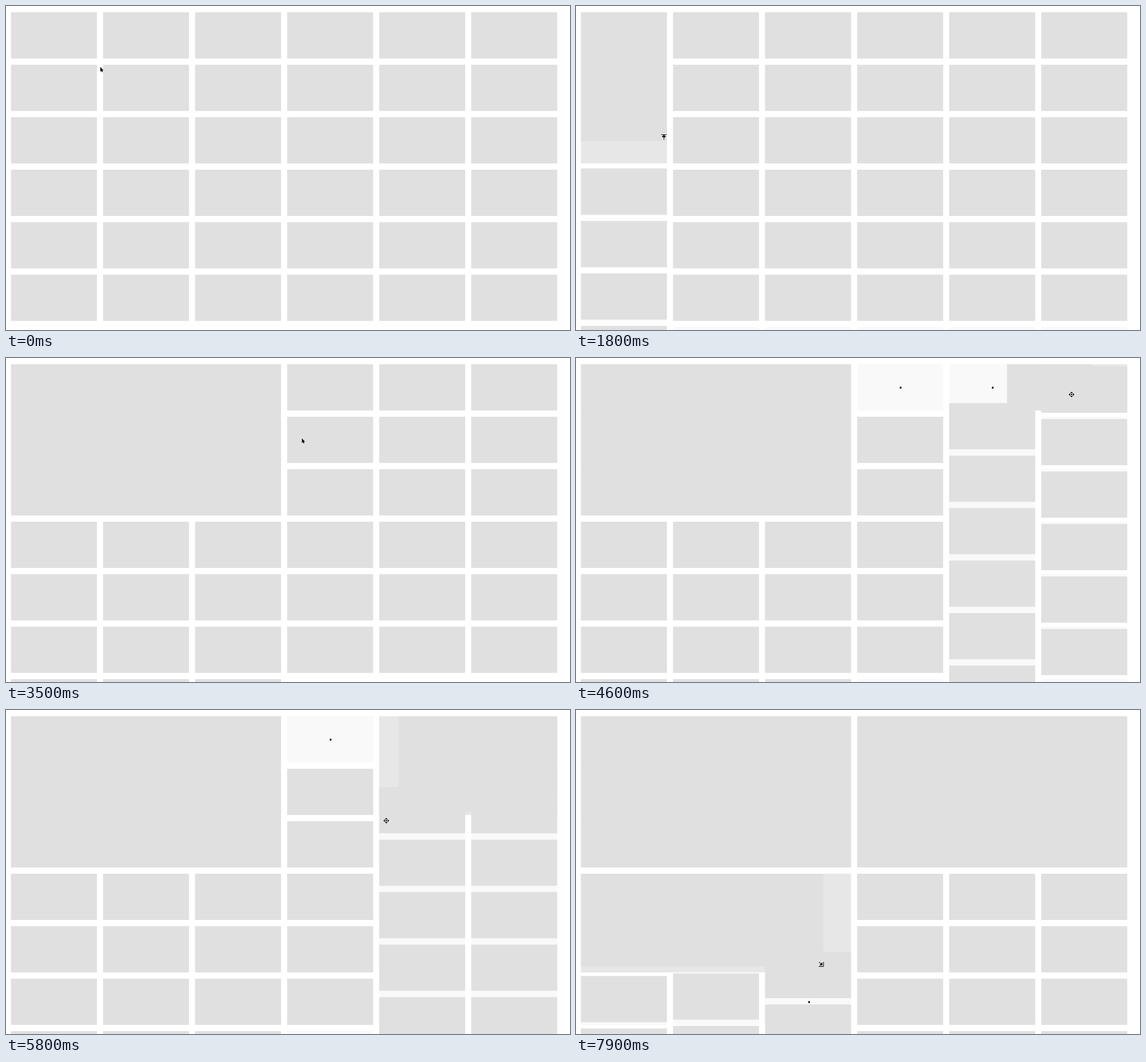
An HTML page with a canvas that plays this animation: 986x568 px, repeating every 8000 ms.

```html
<!DOCTYPE html>
<html lang="en">
<head>
<meta charset="utf-8">
<title>Resizable tile grid</title>
<style>
html, body { margin: 0; width: 100%; height: 100%; overflow: hidden; background: #fff; }
canvas { display: block; width: 986px; height: 568px; }
</style>
</head>
<body>
<canvas id="stage" width="986" height="568"></canvas>
<script>
const ctx = document.getElementById('stage').getContext('2d');
const LOOP = 8000, STEP = 100, SETTLE = 250, LAG = 22;
const COLS = 6, ROWS = 6;
const X0 = 8.7, PITCH_X = 160.93, TILE_W = 150.3;
const Y0 = 11, PITCH_Y = 92, TILE_H = 81;
const TILE = '#e0e0e0', SLOT = '#e7e7e7', CELL = '#f9f9f9';

const lerp = (a, b, p) => a + (b - a) * p;
const clamp01 = p => Math.min(1, Math.max(0, p));
const glide = p => 1 - (1 - clamp01(p)) ** 2;

// cubic-bezier(.25, .1, .25, 1)
function ease(p) {
  if (p <= 0 || p >= 1) return clamp01(p);
  const curve = (s, a, b) => 3 * (1 - s) * s * ((1 - s) * a + s * b) + s ** 3;
  let lo = 0, hi = 1;
  for (let i = 0; i < 20; i++) {
    const mid = (lo + hi) / 2;
    if (curve(mid, .25, .25) < p) lo = mid; else hi = mid;
  }
  return curve(lo, .1, 1);
}

// Slots are [column, row, columns wide, rows high]
const tiles = Array.from({ length: COLS * ROWS }, (_, i) => {
  const home = [i % COLS, Math.floor(i / COLS), 1, 1];
  return { home, slot: [...home], pushes: [] };
});
const tileAt = (col, row) => tiles[row * COLS + col];

// sides: which of left, top, right and bottom follow the pointer.
// snaps: when the slot takes its second and third size or place.
const drags = [
  { tile: tileAt(0, 0), sides: [0, 0, 0, 1], icon: 'bar', start: 1302, time: 600,
    x: 154, y: 234, snaps: [1385, 1600], to: [0, 0, 1, 3] },
  { tile: tileAt(0, 0), sides: [0, 0, 1, 0], icon: 'bar', start: 2661, time: 360,
    x: 434, y: 237, snaps: [2687, 2800], to: [0, 0, 3, 3] },
  { tile: tileAt(3, 0), sides: [1, 1, 1, 1], icon: 'move', start: 4415, time: 300,
    x: 915, y: 64, snaps: [4489, 4585], to: [5, 0, 1, 1] },
  { tile: tileAt(3, 0), sides: [1, 0, 0, 1], icon: 'move', start: 5698, time: 300,
    x: 545, y: 275, snaps: [5744, 5850], to: [3, 0, 3, 3] },
  { tile: tileAt(0, 1), sides: [0, 0, 1, 1], icon: 'corner', start: 7620, time: 300,
    x: 430, y: 446, snaps: [7720, 7788], to: [0, 3, 3, 2] }
];

const travels = [
  { start: 100, time: 500, x: 145, y: 83 },
  { start: 2200, time: 300, x: 161, y: 237 },
  { start: 3200, time: 900, x: 584, y: 64 },
  { start: 4800, time: 400, x: 820, y: 89 },
  { start: 6100, time: 400, x: 516, y: 259 },
  { start: 6500, time: 200, x: 355, y: 372 },
  { start: 6700, time: 750, x: 151, y: 363 }
];
const strokes = [...drags, ...travels].sort((a, b) => a.start - b.start);

const slotAfter = (drag, snaps) =>
  drag.from.map((v, i) => Math.round(lerp(v, drag.to[i], snaps / drag.snaps.length)));

// Each snap pushes the tiles in its way down, with all below them
function planPushes() {
  for (const drag of drags) {
    drag.from = [...drag.tile.slot];
    drag.release = drag.start + drag.time;
    drag.snaps.forEach((at, i) => {
      const [col, row, w, h] = slotAfter(drag, i + 1);
      for (let c = col; c < col + w; c++) {
        const below = tiles.filter(tile => tile !== drag.tile && tile.slot[0] === c && tile.slot[1] >= row);
        const rows = row + h - Math.min(...below.map(tile => tile.slot[1]));
        if (rows <= 0) continue;
        for (const tile of below) {
          tile.slot[1] += rows;
          tile.pushes.push({ at, rows });
        }
      }
    });
    drag.tile.slot = [...drag.to];
  }
}

function edges([col, row, w, h]) {
  const left = X0 + PITCH_X * col, top = Y0 + PITCH_Y * row;
  return [left, top, left + PITCH_X * (w - 1) + TILE_W, top + PITCH_Y * (h - 1) + TILE_H];
}

function pointerAt(t) {
  let x = 165, y = 107;
  for (const stroke of strokes) {
    const p = glide((t - stroke.start) / stroke.time);
    x = lerp(x, stroke.x, p);
    y = lerp(y, stroke.y, p);
  }
  return [x, y];
}

function dragEdges(drag, t) {
  const grab = pointerAt(drag.start);
  const now = pointerAt(Math.min(t, drag.release) - LAG);
  const settled = ease((t - drag.release) / SETTLE);
  const target = edges(drag.to);
  return edges(drag.from).map((edge, i) =>
    lerp(edge + drag.sides[i] * (now[i % 2] - grab[i % 2]), target[i], settled));
}

function tileEdges(tile, t) {
  const drag = drags.filter(d => d.tile === tile && d.start <= t).pop();
  if (drag) return dragEdges(drag, t);
  const [col, row, w, h] = tile.home;
  const shift = tile.pushes.reduce((sum, { at, rows }) => sum + rows * ease((t - at) / SETTLE), 0);
  return edges([col, row + shift, w, h]);
}

function fillEdges(color, [left, top, right, bottom]) {
  ctx.fillStyle = color;
  ctx.fillRect(left, top, right - left, bottom - top);
}

function drawCells() {
  for (let col = 0; col < COLS; col++) {
    for (let row = 0; row <= ROWS; row++) {
      const cell = edges([col, row, 1, 1]);
      fillEdges(CELL, cell);
      ctx.fillStyle = '#000';
      ctx.fillRect(Math.round(cell[0] + 75), cell[1] + 39.5, 3, 3);
    }
  }
}

const icons = {
  arrow: { path: new Path2D('M0 0V8L1.8 6.4 3 9 4.2 8.5 3.1 5.9H5.4Z'), halo: 1.2, line: .2 },
  bar: { path: new Path2D('M-4.5-4H4.5M0-3V4.5M-2.7-.2L0-2.9 2.7-.2Z'), halo: 2.6, line: 1.2 },
  corner: { path: new Path2D('M4-4V4M4 4H-4.5M-4-4L1 1M1.4-2.2V1.4H-2.2Z'), halo: 2.6, line: 1.2 },
  move: { path: new Path2D(
    'M0-5l2.3 2.5h-4.6zM0 5l2.3-2.5h-4.6zM-5 0l2.5-2.3v4.6zM5 0l-2.5-2.3v4.6zM-1-1h2v2h-2z'), halo: 1.8, line: .3 }
};

function iconAt(t) {
  const current = strokes.filter(s => s.start <= t).pop();
  if (!current) return icons.arrow;
  if (current.icon) return icons[current.icon];
  if (t < current.start + current.time) return icons.arrow;
  return icons[drags.find(d => d.start > t).icon];
}

function drawPointer(t) {
  const { path, halo, line } = iconAt(t);
  ctx.save();
  ctx.translate(...pointerAt(t));
  ctx.strokeStyle = '#fff';
  ctx.lineWidth = halo;
  ctx.stroke(path);
  ctx.strokeStyle = ctx.fillStyle = '#000';
  ctx.lineWidth = line;
  ctx.fill(path);
  ctx.stroke(path);
  ctx.restore();
}

function draw(t) {
  fillEdges('#fff', [0, 0, 986, 568]);
  const active = drags.find(d => t >= d.start && t < d.release + SETTLE);
  if (active) {
    drawCells();
    fillEdges(SLOT, edges(slotAfter(active, active.snaps.filter(at => at <= t).length)));
  }
  for (const tile of tiles) fillEdges(TILE, tileEdges(tile, t));
  drawPointer(t);
}

planPushes();
const begin = performance.now();
function tick() {
  const t = (performance.now() - begin) % LOOP;
  draw(Math.floor(t / STEP) * STEP);
  requestAnimationFrame(tick);
}
tick();
</script>
</body>
</html>
```
